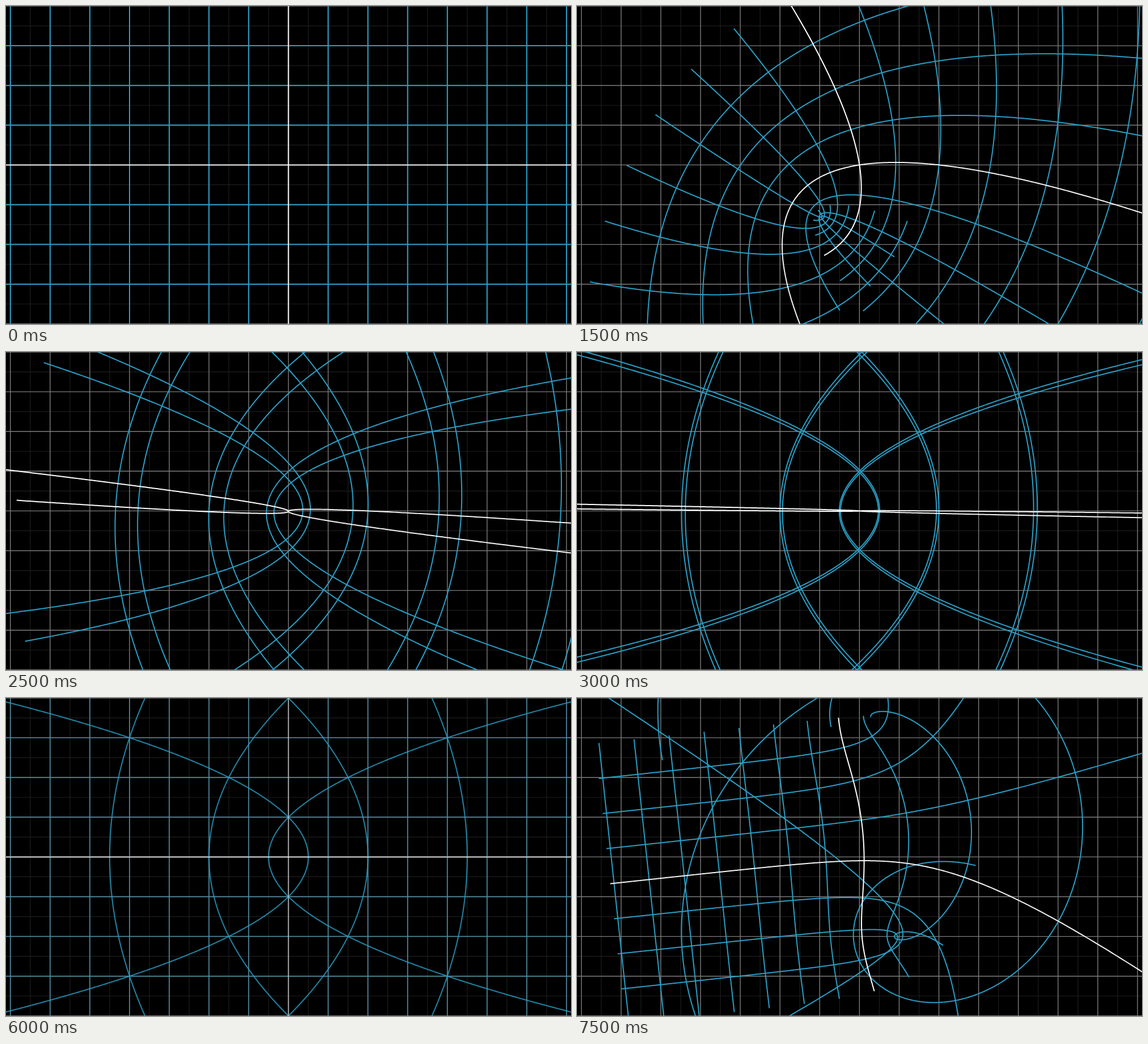
An HTML page with a canvas that plays this animation: 997x561 px, repeating every 8000 ms.

```html
<!DOCTYPE html>
<html lang="en">
<head>
<meta charset="utf-8">
<title>Complex maps of the plane</title>
<style>
html, body { margin: 0; width: 100%; height: 100%; overflow: hidden; background: #000; }
canvas { display: block; }
</style>
</head>
<body>
<canvas id="stage" width="997" height="561"></canvas>
<script>
const ctx = document.getElementById('stage').getContext('2d');
const W = 997, H = 561, UNIT = 70.1, CX = 498.4, CY = 280.4;
const X_MAX = 7.11, Y_MAX = 4;
const LOOP = 8000, STEP = 500, RUN = 3000;
const SQUARE_AT = 416, FADE_AT = 5520, EXP_AT = 6542;
const BLUE = '#2a9ec5';

const square = (x, y) => [(x * x - y * y) / 2, x * y];
const exp = (x, y) => [Math.exp(x) * Math.cos(y), Math.exp(x) * Math.sin(y)];

// Sigmoid easing, rescaled to run exactly from 0 to 1
function smooth(t) {
  t = Math.min(1, Math.max(0, t));
  const sig = v => 1 / (1 + Math.exp(-v));
  const err = sig(-5);
  return (sig(10 * (t - 0.5)) - err) / (1 - 2 * err);
}

// Moves each point z to map(z) along a quarter-circle arc
function arcMap(map, a) {
  const q = Math.PI / 4;
  const r = Math.sin(a * q) / Math.sin(q), turn = (a - 1) * q;
  const sx = r * Math.cos(turn), sy = r * Math.sin(turn);
  return (x, y) => {
    const [u, v] = map(x, y);
    const dx = u - x, dy = v - y;
    return [x + sx * dx - sy * dy, y + sx * dy + sy * dx];
  };
}

function strokeCurve(point, max, color, width) {
  const n = 600;
  ctx.beginPath();
  for (let i = 0; i <= n; i++) {
    const [x, y] = point(max * (2 * i / n - 1));
    ctx.lineTo(CX + UNIT * x, CY - UNIT * y);
  }
  ctx.strokeStyle = color;
  ctx.lineWidth = width;
  ctx.stroke();
}

function drawGrid(f, alpha) {
  if (alpha <= 0) return;
  const vertical = (k, c) => strokeCurve(s => f(k, s), Y_MAX, c, 2);
  const horizontal = (k, c) => strokeCurve(s => f(s, k), X_MAX, c, 2);
  ctx.globalAlpha = alpha;
  for (let k = -7; k <= 7; k++) if (k) vertical(k, BLUE);
  for (let k = -3; k <= 3; k++) if (k) horizontal(k, BLUE);
  horizontal(0, '#f4f4f4');
  vertical(0, '#fff');
  ctx.globalAlpha = 1;
}

function drawLines(offset, color, width) {
  ctx.beginPath();
  for (let k = -8 + offset; k <= 8; k++) {
    const x = CX + k * UNIT, y = CY + k * UNIT;
    ctx.moveTo(x, 0);
    ctx.lineTo(x, H);
    ctx.moveTo(0, y);
    ctx.lineTo(W, y);
  }
  ctx.strokeStyle = color;
  ctx.lineWidth = width;
  ctx.stroke();
}

function draw(t) {
  ctx.fillStyle = '#000';
  ctx.fillRect(0, 0, W, H);
  drawLines(0.5, '#1e1e1e', 1.2);
  drawLines(0, '#7c7c7c', 1.4);
  const fade = smooth((t - FADE_AT) / 1000);
  drawGrid(arcMap(square, smooth((t - SQUARE_AT) / RUN)), 1 - fade);
  drawGrid(arcMap(exp, smooth((t - EXP_AT) / RUN)), fade);
}

// The picture advances twice a second
function frame() {
  const t = performance.now() % LOOP;
  draw(Math.floor(t / STEP) * STEP);
  requestAnimationFrame(frame);
}
frame();
</script>
</body>
</html>
```
